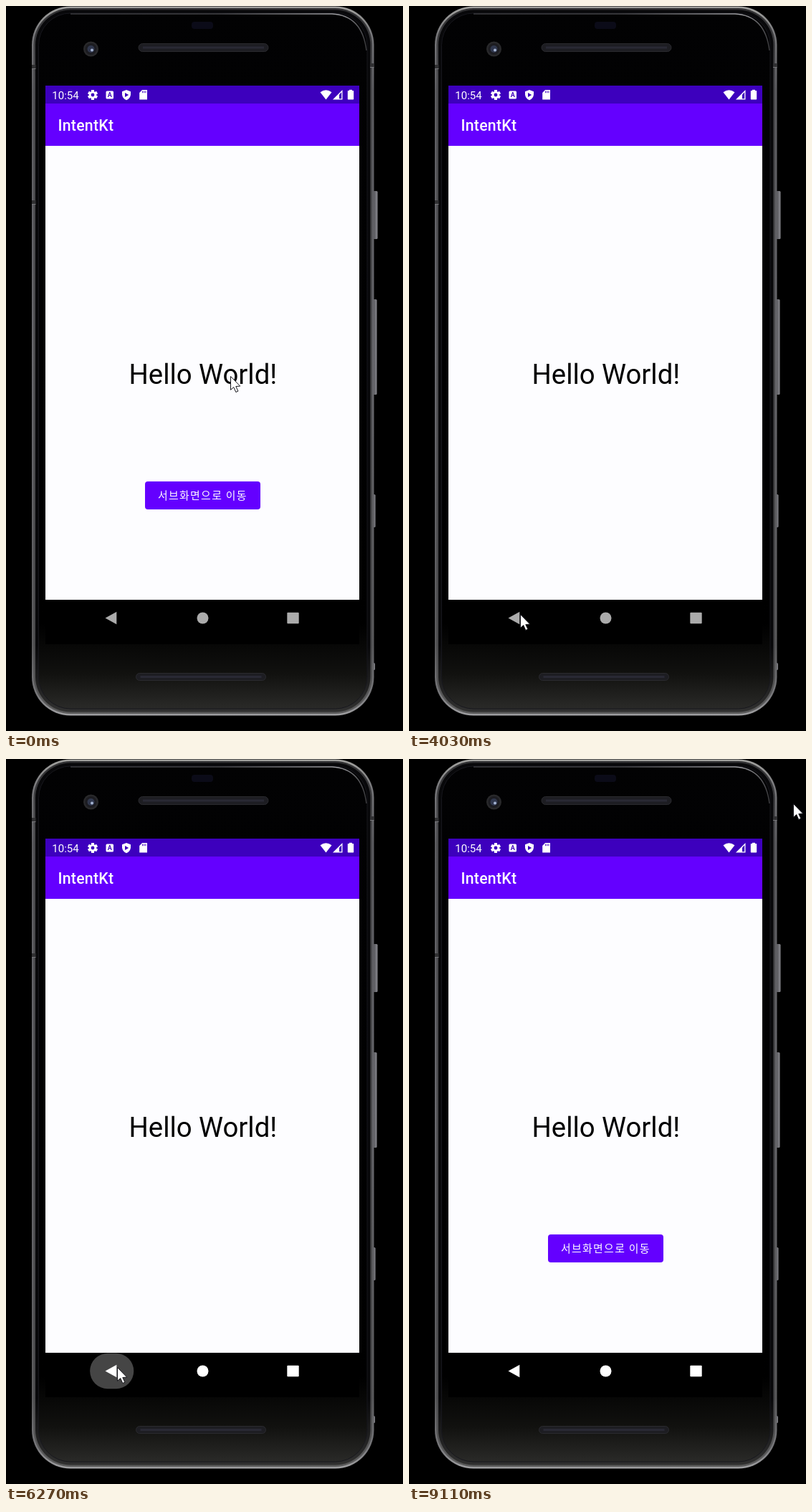
An HTML page with a canvas that plays this animation: 554 by 1011 pixels, repeating every 9.2 s.

```html
<!DOCTYPE html>
<html lang="ko">
<head>
<meta charset="utf-8">
<title>IntentKt</title>
<style>
  html, body { margin: 0; width: 100%; height: 100%; overflow: hidden; background: #000; }
  canvas { display: block; width: 554px; height: 1011px; }
</style>
</head>
<body>
<canvas id="stage" width="554" height="1011"></canvas>
<script>
const ctx = document.getElementById('stage').getContext('2d');
const LOOP = 9200;
const SCREEN = { x: 55, y: 111, w: 438, h: 779, cx: 274.3, cy: 500 };
const BUTTON = [194, 663, 161, 39, 4];
const PURPLE = '#6400ff', DARK = '#3d00bd', PAPER = '#fdfdff';

const openTaps = [2730, 5220, 7085];
const backTaps = [4193, 6190, 8130];
const OPEN_LAG = 294, CLOSE_LAG = 200, SLIDE = 400;

// time, x, y of the pointer tip
const pointer = [
  [0, 313, 516], [930, 318, 548], [1430, 330, 640], [1630, 330, 640],
  [2170, 333, 670], [2300, 333, 670], [2470, 300, 684], [2850, 300, 684],
  [3170, 241, 752], [3560, 155, 848], [4290, 155, 848],
  [4570, 260, 714], [4760, 278, 699], [5330, 278, 699],
  [5800, 155, 848], [6290, 155, 848], [6800, 278, 699], [7200, 278, 699],
  [7750, 155, 848], [8240, 155, 848], [9110, 536, 62], [LOOP, 536, 62]
];

const clamp = v => Math.max(0, Math.min(1, v));
const lerp = (a, b, k) => a + (b - a) * k;
const smooth = k => k * k * (3 - 2 * k);
const bezier = (a, b, c, d, u) =>
  a * (1 - u) ** 3 + 3 * b * u * (1 - u) ** 2 + 3 * c * u * u * (1 - u) + d * u ** 3;

// fast-out, extra-slow-in: two joined Bezier segments
function emphasize(x) {
  if (x <= 0) return 0;
  if (x >= 1) return 1;
  const [xs, ys] = x < 1 / 6
    ? [[0, 0.05, 0.1333, 1 / 6], [0, 0, 0.06, 0.4]]
    : [[1 / 6, 0.2083, 0.25, 1], [0.4, 0.82, 1, 1]];
  let lo = 0, hi = 1;
  for (let i = 0; i < 24; i++) {
    const mid = (lo + hi) / 2;
    if (bezier(...xs, mid) < x) lo = mid; else hi = mid;
  }
  return bezier(...ys, lo);
}

function rect(x, y, w, h, fill) {
  ctx.fillStyle = fill;
  ctx.fillRect(x, y, w, h);
}

function round(x, y, w, h, r, fill, stroke, width = 1) {
  ctx.beginPath();
  ctx.roundRect(x, y, w, h, r);
  if (fill) { ctx.fillStyle = fill; ctx.fill(); }
  if (stroke) { ctx.strokeStyle = stroke; ctx.lineWidth = width; ctx.stroke(); }
}

function disc(x, y, r, fill) {
  ctx.beginPath();
  ctx.arc(x, y, r, 0, Math.PI * 2);
  ctx.fillStyle = fill;
  ctx.fill();
}

function poly(points, fill) {
  ctx.beginPath();
  points.forEach(([x, y]) => ctx.lineTo(x, y));
  ctx.closePath();
  ctx.fillStyle = fill;
  ctx.fill();
}

function label(text, x, y, font, fill, spacing = 0, align = 'left') {
  ctx.font = font;
  ctx.letterSpacing = spacing + 'px';
  ctx.textAlign = align;
  ctx.fillStyle = fill;
  ctx.fillText(text, x, y);
}

function gradient(x0, y0, x1, y1, ...stops) {
  const g = ctx.createLinearGradient(x0, y0, x1, y1);
  stops.forEach(([at, color]) => g.addColorStop(at, color));
  return g;
}

function drawGrille(x, y, w, h) {
  round(x, y, w, h, h / 2, '#1d1d22', '#2a2a2e');
  rect(x + 6, y + h / 2 - 1.5, w - 12, 3, '#292934');
}

function drawPhone() {
  rect(0, 0, 554, 1011, '#000');

  // side keys
  for (const [y, h, w] of [[258, 67, 5.5], [409, 133, 4.5], [681, 46, 2.5], [916, 10, 2]]) {
    round(511, y, w + 2, h, 1.5, gradient(511, 0, 513 + w, 0, [0, '#3c3c40'], [1, '#8c8c92']));
  }

  // layered shell, from the bright rim to the glass
  const shell = (inset, fill, stroke) =>
    round(36 + inset, inset + 0.5, 477.5 - 2 * inset, 989 - 2 * inset, 54 - inset, fill, stroke);
  shell(0, gradient(0, 0, 0, 990, [0, '#a3a3a0'], [0.04, '#77777a'], [0.12, '#5c5c60'],
    [0.5, '#68686d'], [0.9, '#5a5a5c'], [0.97, '#77777a'], [1, '#a0a0a2']));
  shell(2.5, gradient(0, 0, 0, 990, [0, '#303032'], [0.1, '#48484b'], [0.9, '#48484a'], [1, '#5c5c5c']));
  shell(5, gradient(0, 0, 0, 990, [0, '#08080a'], [0.9, '#08080a'], [1, '#333332']));
  shell(9.5, gradient(0, 0, 0, 990, [0, '#020203'], [0.87, '#000'], [0.94, '#11110f'], [0.99, '#2a2a28']),
    '#17171d');
  ctx.strokeStyle = gradient(85, 0, 505, 0, [0, '#3a3a3e'], [0.5, '#434347'], [0.9, '#a0a0a4'], [1, '#38383b']);
  ctx.lineWidth = 1.4;
  ctx.beginPath();
  ctx.moveTo(90, 11);
  ctx.lineTo(455, 11);
  ctx.quadraticCurveTo(497, 13, 503, 62);
  ctx.stroke();

  // antenna bands
  for (const [x, y] of [[36, 82], [36, 271], [508, 80]]) {
    rect(x, y, 5.5, 5, '#303032');
    rect(x, y + 5, 5.5, 1, '#77777b');
  }

  round(259, 22, 30, 10, 4, '#0b0b18');
  disc(118.5, 60, 10.5, '#29292b');
  disc(118.5, 60, 8, '#1c1c21');
  disc(118.5, 60, 5, '#30374d');
  disc(120, 61.5, 2, '#a5b4d2');
  drawGrille(185, 52.5, 181, 11);
  drawGrille(181.5, 930.5, 181, 10);
}

function drawButton(ripple) {
  round(...BUTTON, PURPLE);
  if (ripple) {
    ctx.save();
    ctx.beginPath();
    ctx.roundRect(...BUTTON);
    ctx.clip();
    disc(ripple.x, 686, ripple.r, `rgba(255,255,255,${ripple.a})`);
    ctx.restore();
  }
  label('서브화면으로 이동', 212, 688, '14.9px "Noto Sans CJK KR", "Noto Sans CJK", sans-serif', '#fff', 1.33);
}

function drawPage(scale, alpha, isMain, ripple) {
  if (alpha <= 0) return;
  ctx.save();
  ctx.globalAlpha = alpha;
  ctx.translate(SCREEN.cx, SCREEN.cy);
  ctx.scale(scale, scale);
  ctx.translate(-SCREEN.cx, -SCREEN.cy);
  const { x, w } = SCREEN;
  rect(x, 111, w, 25, DARK);
  rect(x, 136, w, 59, PURPLE);
  rect(x, 195, w, 633, PAPER);
  rect(x, 828, w, 62, '#000');
  label('IntentKt', 72.4, 174, '500 21.3px Roboto, sans-serif', '#fff', 0.27);
  label('Hello World!', 274.8, 527, '38.3px Roboto, sans-serif', '#000', 0, 'center');
  if (isMain) drawButton(ripple);
  ctx.restore();
}

function drawStatus() {
  label('10:54', 64.3, 129.7, '15px Roboto, sans-serif', '#fff');

  // settings gear
  ctx.save();
  ctx.translate(121, 124);
  for (let i = 0; i < 6; i++) {
    ctx.rotate(Math.PI / 3);
    rect(-2, -7, 4, 4, '#fff');
  }
  disc(0, 0, 5.2, '#fff');
  disc(0, 0, 2.4, DARK);
  ctx.restore();

  round(139.5, 118.5, 10.5, 11, 1.5, '#fff');
  label('A', 144.8, 127.4, 'bold 9px Roboto, sans-serif', DARK, 0, 'center');

  // shield
  ctx.beginPath();
  ctx.moveTo(168, 117);
  ctx.lineTo(174, 119.3);
  ctx.lineTo(174, 123.5);
  ctx.quadraticCurveTo(173.5, 129, 168, 131.3);
  ctx.quadraticCurveTo(162.5, 129, 162, 123.5);
  ctx.lineTo(162, 119.3);
  ctx.fillStyle = '#fff';
  ctx.fill();
  poly([[166, 121], [171.2, 124], [166, 127]], DARK);

  // memory card
  poly([[190, 117], [197, 117], [197, 130.5], [186.2, 130.5], [186.2, 121]], '#fff');
  for (let i = 0; i < 3; i++) rect(190 + i * 2.2, 118.5, 1, 2.7, DARK);

  // wifi, signal, battery
  ctx.beginPath();
  ctx.moveTo(446.5, 130.5);
  ctx.lineTo(438.5, 120.3);
  ctx.quadraticCurveTo(446.5, 114, 454.5, 120.3);
  ctx.fillStyle = '#fff';
  ctx.fill();
  poly([[456, 130.5], [469.5, 117], [469.5, 130.5]], '#fff');
  poly([[465, 123.4], [468.2, 120.2], [468.2, 129.2], [465, 129.2]], DARK);
  rect(479, 116.8, 4, 2, '#fff');
  round(476.8, 118, 8.4, 12.6, 0.8, '#fff');
}

function drawNav(t) {
  const tap = backTaps.findLast(p => p <= t);
  const age = t - tap;
  if (age < 430) {
    const half = 56.5 * (1 - (1 - clamp(age / 350)) ** 3);
    const a = 0.27 * (1 - clamp((age - 110) / 320));
    const tall = Math.min(24.7, half);
    round(147.7 - half, 853.5 - tall, half * 2, tall * 2, tall, `rgba(255,255,255,${a})`);
  }
  const ink = t < backTaps[0] ? '#ababab' : '#fff';
  poly([[138.5, 853.5], [154.3, 844.8], [154.3, 862.2]], ink);
  disc(274.5, 853.5, 8, ink);
  round(392.3, 845.7, 16.4, 15.6, 1, ink);
}

function pointerAt(t) {
  const i = pointer.findIndex(p => p[0] > t);
  const [t0, x0, y0] = pointer[i - 1], [t1, x1, y1] = pointer[i];
  const k = smooth((t - t0) / (t1 - t0));
  return [lerp(x0, x1, k), lerp(y0, y1, k)];
}

function drawPointer(t) {
  const [x, y] = pointerAt(t);
  ctx.save();
  ctx.translate(x + 0.5, y + 0.5);
  poly([[0, 0], [0, 18.8], [4.2, 15], [7.3, 22], [10.4, 20.6], [7.3, 14], [13.2, 13.6]], '#fff');
  ctx.strokeStyle = '#16161c';
  ctx.lineWidth = 1;
  ctx.stroke();
  ctx.restore();
}

function tapRipple(t) {
  const tap = openTaps.findLast(p => p <= t);
  const age = t - tap;
  if (!(age < 500)) return null;
  const grow = 1 - (1 - clamp(age / 225)) ** 2;
  return { x: pointerAt(tap)[0], r: 22 + 65 * grow, a: 0.2 * (1 - clamp((age - 180) / 300)) };
}

function drawPages(t) {
  const open = openTaps.map(p => p + OPEN_LAG).findLast(s => s <= t) ?? -1e4;
  const close = backTaps.map(p => p + CLOSE_LAG).findLast(s => s <= t) ?? -1e3;
  const opening = open > close;
  const age = t - Math.max(open, close);
  const p = emphasize(age / SLIDE);

  ctx.save();
  ctx.beginPath();
  ctx.rect(SCREEN.x, SCREEN.y, SCREEN.w, SCREEN.h);
  ctx.clip();
  if (opening) {
    if (p < 1) drawPage(1 + 0.05 * p, 1, true, tapRipple(t));
    drawPage(0.85 + 0.15 * p, clamp((age - 35) / 65), false);
  } else {
    drawPage(1.05 - 0.05 * p, 1, true, tapRipple(t));
    drawPage(1 - 0.1 * p, 1 - clamp((age - 35) / 83), false);
  }
  ctx.restore();
}

function frame(now) {
  const t = now % LOOP;
  drawPhone();
  drawPages(t);
  drawStatus();
  drawNav(t);
  drawPointer(t);
}

let start;
function tick(now) {
  start ??= now;
  frame(Math.max(0, now - start));
  requestAnimationFrame(tick);
}
frame(0);
requestAnimationFrame(tick);
</script>
</body>
</html>
```
